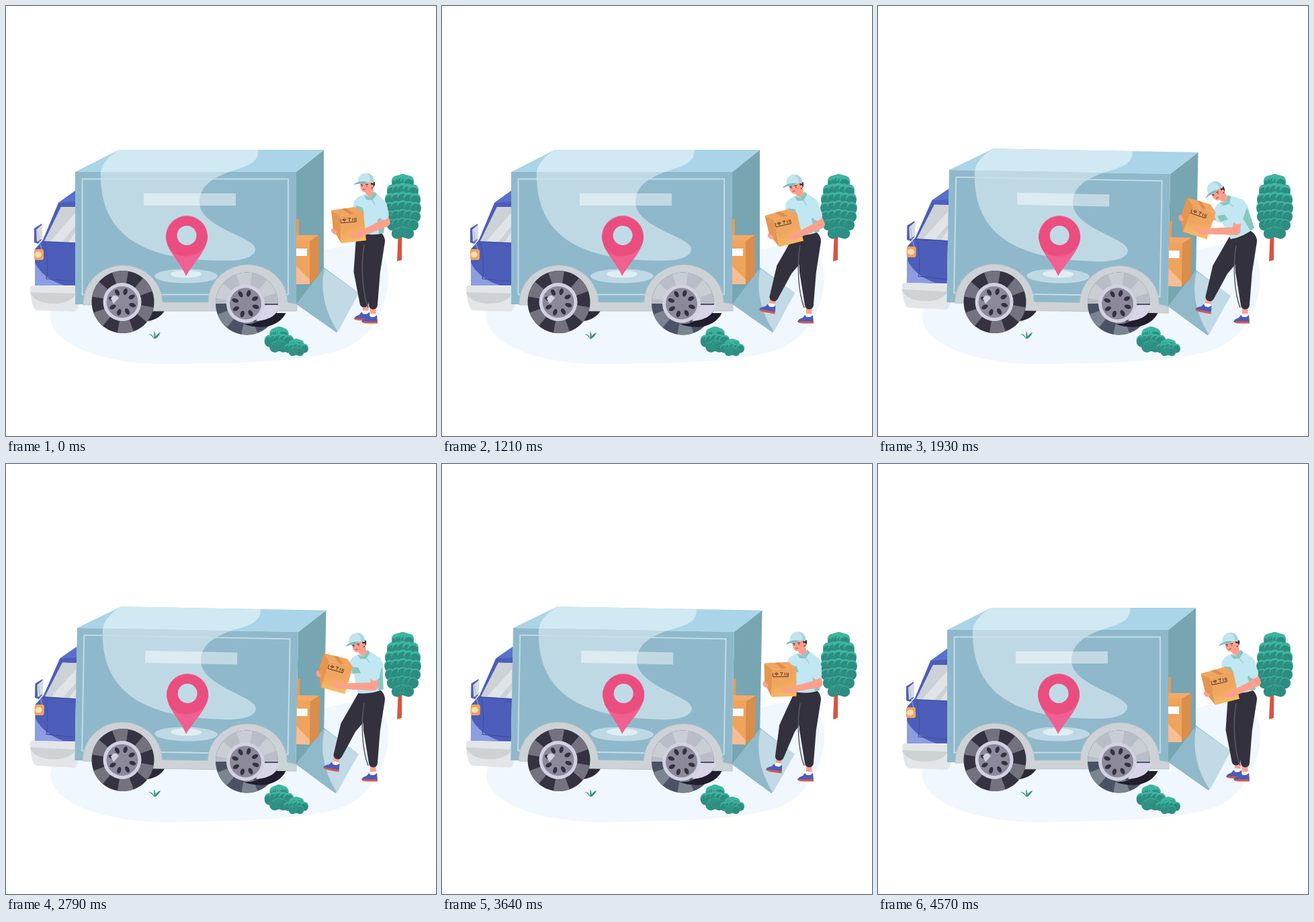
Recreate the animation shown at these times as an HTML page. Size 640 px wide and 640 px high, loop 4780 ms.

```html
<!DOCTYPE html>
<html lang="en">
<head>
<meta charset="utf-8">
<title>Delivery</title>
<style>
  html, body { margin: 0; width: 100%; height: 100%; overflow: hidden; background: #fff; }
  svg { display: block; width: 100%; height: 100%; }
</style>
</head>
<body>
<svg viewBox="0 0 640 640">
  <defs>
    <linearGradient id="card" x1="0" y1="0" x2=".3" y2="1">
      <stop offset="0" stop-color="#efa15b"/><stop offset=".6" stop-color="#f0a660"/><stop offset="1" stop-color="#f7ba60"/>
    </linearGradient>
    <g id="shoe">
      <path d="M-4-2H4.500V8H-4Z" fill="#fca08d"/>
      <path d="M-4 6H4.500L5 13H-5Z" fill="#fff"/>
      <path d="M-17 18Q-16 14-9 12L-6 8L-3 11H2L6 8L7 18Z" fill="#4c5bb9"/>
      <path d="M-17 17.500H7V20.500H-8Q-16 20.500-17 17.500Z" fill="#dc5745"/>
    </g>
    <g id="hub">
      <circle r="28.500" fill="#d2d1e2"/><circle r="23.500" fill="#8b899b"/>
      <g id="holes" fill="#34323f"></g>
    </g>
    <circle id="tread" r="37" pathLength="12" transform="rotate(-50)" fill="none" stroke-width="19" stroke-dasharray="1 1"/>
  </defs>

  <path fill="#f0f7ff" d="M66 462C66 502 140 533 240 533C335 532 440 530 495 513C550 495 569 440 569 402C569 368 547 352 522 354C490 357 460 366 440 380L75 440Q66 450 66 462Z"/>
  <path d="M584 335H589.500L589 378L582 380Z" fill="#d95340"/>
  <g id="tree"></g>
  <path fill="#2d2939" d="M200 452H237C230 465 215 471 200 469Z"/>

  <g id="truck">
    <path fill="#90b9ca" d="M473 389L525 427L492 486L431 443Z"/>
    <path fill="#c1dae5" d="M474 391L525 427L494 485C477 460 466 425 474 391Z"/>
    <path fill="#77a6b2" d="M432 247L473 214V390L432 444Z"/>
    <path fill="#e79a54" d="M432 317H436V343H432Z"/>
    <path fill="#f3a866" d="M432 341H466L452 350H432Z"/>
    <path fill="#f0a35c" d="M432 349H452V414H432Z"/>
    <path fill="#db8d4b" d="M452 350L466 341V401L452 414Z"/>
    <path fill="#f7bd94" d="M432 387L452 407V414H432Z"/>
    <path fill="#fff" d="M432 361H448V372H432Z"/>

    <path fill="#4c5eba" d="M103 275L78 293L55 348L43 362V416H103Z"/>
    <path fill="#5971cd" d="M103 275L78 293L103 291Z"/>
    <path fill="#8d9ddf" d="M43 382Q55 406 87 416H43Z"/>
    <path fill="#e0e4e8" d="M82 299L103 300V352L57 350Z"/>
    <path fill="#cdd2d6" d="M80 303L85 299H103V308L66 350H57ZM84 351L103 328V337L93 351Z"/>
    <path fill="none" stroke="#3f4fa3" stroke-width="1.200" d="M54 351L103 353M58 353Q64 390 60 406L103 410M94 357H103"/>
    <path fill="#4c5eba" d="M42 331L53 324V348L48 354L42 352Z"/>
    <path fill="#d7dce1" d="M45 333L54 325V346L46 351Z"/>
    <path fill="none" stroke="#aab1bd" d="M47 334L50 352L53 362"/>
    <rect x="42" y="362" width="14" height="16" rx="3" fill="#efa45c"/>
    <ellipse cx="48" cy="370" rx="5" ry="4.500" fill="#fbdbb4"/>
    <path fill="#e2e6e9" d="M36 420Q36 416 42 416L102 417Q110 418 110 433Q109 451 103 455L46 453Q38 451 36 420Z"/>
    <path fill="#ced2d5" d="M36 426L104 428C100 437 87 443 71 443C55 443 40 438 36 426Z"/>

    <path fill="#aad4e8" d="M103 247L168 214H473L432 247Z"/>
    <path fill="#8fb9cb" d="M103 247H432V444H103Z"/>
    <path fill="#d1e9f3" d="M168 214C153 223 143 235 141 247H332C353 240 378 235 375 214Z"/>
    <path fill="#bfd9e4" d="M141 247C139 335 195 378 320 379C355 380 372 372 371 361C369 343 288 330 288 292C288 268 308 256 332 247Z"/>
    <rect x="113.500" y="257.500" width="306.500" height="172" fill="none" stroke="#c6dee8" stroke-width="1.800"/>
    <path fill="#fff" opacity=".45" d="M205 279H342V297H205Z"/>
    <ellipse cx="268" cy="402" rx="47" ry="10.500" fill="#bfd9e4"/>
    <ellipse cx="268" cy="399" rx="23" ry="5.500" fill="#dfeef3"/>
    <path fill="#f06090" d="M268 402C259 380 238 364 238 343A31 31 0 0 1 300 343C300 364 279 382 268 402Z"/>
    <path fill="#ea4e7f" d="M238 346A31 31 0 0 1 300 343C300 376 250 382 241 357Z"/>
    <circle cx="269" cy="341.500" r="14.500" fill="#c1dbe6"/>
    <path fill="#cdd2d6" stroke="#b8bfc4" stroke-width=".8" d="M115 445A59 57 0 0 1 233 441H301A59 56 0 0 1 419 441L433 444V454H130V445Z"/>
  </g>

  <g transform="translate(174 440.500)">
    <circle r="46.500" fill="#353341"/>
    <use href="#tread" stroke="#73727e"/>
    <use href="#hub" x="-1"/>
    <path d="M-18-5Q-13-14-6-6L-14 3Z" fill="#d2d1e2"/>
  </g>
  <g transform="translate(358.500 443)">
    <circle r="46.500" fill="#4b5266"/>
    <use href="#tread" stroke="#7b8591"/>
    <path d="M-46.500 0A46.500 46.500 0 0 1 46.500 0Z" fill="#eef1f3" opacity=".68"/>
    <path d="M-6 30Q20 32 30 14H58C50 30 28 42-6 30Z" fill="#211d2e"/>
    <path d="M20 2H48C46 16 36 24 14 26Z" fill="#d9d5e8"/>
    <use href="#hub" x="-2"/>
  </g>

  <path fill="#2c8d80" d="M220 495Q219 488 212 488Q216 489 220 495ZM220 495Q221 488 220 484Q224 488 222 495ZM221 495Q225 487 230 486Q228 491 223 495Z"/>
  <g id="bush"></g>

  <g id="man">
    <use id="footA" href="#shoe"/>
    <use href="#shoe" x="546" y="452"/>
    <path id="legA" fill="#34313f"/>
    <path id="legB" fill="#34313f"/>
    <path fill="none" stroke="#5c5a68" stroke-width="1.500" d="M533 356C528 385 530 425 539 449"/>
    <path id="farArm" fill="#fca08d"/>
    <g id="torso">
      <path fill="#fca08d" d="M533 272L546 268L548 283L538 286Z"/>
      <path fill="#c0e7f2" d="M536 280C527 282 519 286 518 292L516 305L523 309V337Q543 343 562 338C564 325 567 313 568 303C566 290 556 282 548 277L543 286Z"/>
      <path fill="#87c6c0" d="M521 297L531 300L533 309L521 307ZM553 318L566 306L562 338L555 339Z"/>
      <path fill="#87c6c0" d="M533 281L542 285L549 276L552 281L545 289L536 288Z"/>
      <path fill="none" stroke="#96ced0" stroke-width="1.200" d="M545 288L551 300"/>
      <path fill="#35262f" d="M541 261L549 262Q550 270 543 272Z"/>
      <path fill="#fca08d" d="M527 263L543 262L544 271Q540 279 533 277Q527 276 527 263Z"/>
      <circle cx="545" cy="268" r="2.200" fill="#fca08d"/>
      <path fill="none" stroke="#4a2830" stroke-width="1.100" d="M528 266H531M535 265.500H539M530 267V268.500M537 267V268.500"/>
      <path fill="none" stroke="#d9474f" stroke-width="1.300" d="M531 273H535"/>
      <path fill="#c1e6ef" d="M524 263C523 254 528 249 536 248.500C545 249 549 255 547 264Q536 260 524 263Z"/>
      <path fill="#a7d5de" d="M537 249Q544 254 542 262L547 264Q549 251 537 249Z"/>
      <path fill="#7dbdbd" d="M518 265Q525 259 539 262L532 265Q524 264 518 266Z"/>
    </g>
    <g id="parcel">
      <path fill="#f1a55f" d="M-25-14L11-19L23-11L-12-6Z"/>
      <path fill="#dc8d49" d="M-9-16L-3-17L9-9L2-8Z"/>
      <path fill="#e59550" d="M-25-14L-12-6L-10 35L-22 15Z"/>
      <path fill="url(#card)" d="M-12-6L23-11L27 31L-10 35Z"/>
      <path transform="rotate(-5)" fill="none" stroke="#4b3428" stroke-width=".9" d="M-11 4H12V-2M-11-2V4M-8 0Q-6-4-3 0ZM-5.500 0V2.500M0-2H4L2 0V2.500M7 2.500V-2M10 2.500V-2"/>
      <path fill="#fca08d" d="M-24 13Q-19 14-16 19L-18 22L-22 21L-25 17Z"/>
    </g>
    <path id="nearArm" fill="#fca08d"/>
    <path id="sleeve" fill="#c0e7f2"/>
  </g>
</svg>
<script>
const LOOP = 4780, FRAMES = 67, STEP = LOOP / FRAMES;
const WAIST = [545, 338];
const $ = id => document.getElementById(id);
const set = (id, name, value) => $(id).setAttribute(name, value);

const ramp = (t, from, to) => Math.min(1, Math.max(0, (t - from) / (to - from)));
const mix = (a, b, k) => Array.isArray(a) ? a.map((v, i) => mix(v, b[i], k)) : a + (b - a) * k;
const blend = (a, b, k) => Object.fromEntries(Object.keys(a).map(key => [key, mix(a[key], b[key], k)]));

// Rows of leaf lumps inside an oval; the light rims thin out towards the ground.
function clump(id, cx, cy, rx, ry, r, rows) {
  let svg = '';
  for (let row = 0; row < rows; row++) {
    const k = row / (rows - 1), v = 2 * k - 1;
    const half = rx * Math.sqrt(1 - .8 * v * v);
    for (let side = -1; side <= 1; side += .5) {
      const x = cx + side * half, y = cy + v * ry + Math.abs(side) * r * .3;
      svg += `<circle cx="${x}" cy="${y}" r="${r}" fill="#3cb6a0"/>` +
        `<circle cx="${x}" cy="${y + r * mix(.6, .05, k)}" r="${r - .3}" fill="#2e8c80"/>`;
    }
  }
  $(id).innerHTML += svg;
}
clump('tree', 590.5, 297, 19.5, 39, 8, 7);
clump('bush', 406.5, 495, 14, 10, 8, 3);
clump('bush', 432, 507, 12, 6, 6, 3);

$('holes').innerHTML = Array.from({ length: 8 }, (_, i) =>
  `<ellipse cy="-16" rx="3" ry="5" transform="rotate(${i * 45 + 17})"/>`).join('');

function turn([x, y], deg, [cx, cy]) {
  const a = deg * Math.PI / 180, c = Math.cos(a), s = Math.sin(a);
  return [cx + x * c - y * s, cy + x * s + y * c];
}

// Tapered limb with round ends.
function limb([ax, ay], [bx, by], ra, rb) {
  const d = Math.hypot(bx - ax, by - ay) || 1;
  const nx = (ay - by) / d, ny = (bx - ax) / d;
  return `M${ax + nx * ra} ${ay + ny * ra}A${ra} ${ra} 0 0 1 ${ax - nx * ra} ${ay - ny * ra}` +
    `L${bx - nx * rb} ${by - ny * rb}A${rb} ${rb} 0 0 1 ${bx + nx * rb} ${by + ny * rb}Z`;
}

const leg = (hip, knee, ankle) => limb(hip, knee, 17, 12.5) + limb(knee, ankle, 12.5, 6.5);
set('legB', 'd', leg([547, 350], [544.5, 395], [546.5, 445]));

function drawStride(p) {
  const ankle = mix([533, 442], [494, 433], p);
  set('legA', 'd', leg([537.5, 352], mix([530, 395], [510, 391], p), ankle));
  set('footA', 'transform', `translate(${mix([535, 447.5], [492, 437], p)}) rotate(${10 * p})`);
}

const rest = { lean: 0, box: [509, 318], spin: 0, elbow: [566, 322] };
const carry = { lean: -8.5, box: [507, 322.5], spin: -8, elbow: [564, 325] };
const reach = { lean: -27, box: [477, 308], spin: 24, elbow: [533, 335] };
const load = { lean: 0, box: [499, 301], spin: 20, elbow: [556, 329] };

function poseAt(t) {
  const carried = blend(rest, carry, ramp(t, 360, 1030));
  const reached = blend(carried, reach, ramp(t, 1250, 1930));
  const raised = blend(reached, load, ramp(t, 2070, 3210));
  return blend(raised, carry, ramp(t, 3210, 4000));
}

function drawBody({ lean, box, spin, elbow }) {
  const onBody = point => turn(point, lean, WAIST);
  const onBox = point => turn(point, spin, box);
  set('torso', 'transform', `rotate(${lean} ${WAIST})`);
  set('parcel', 'transform', `translate(${box}) rotate(${spin})`);

  const shoulder = onBody([13, -41]), wrist = onBox([15, 23]);
  set('farArm', 'd', limb(onBody([-20, -36]), onBox([-19, 18]), 4, 3));
  set('nearArm', 'd', limb(shoulder, elbow, 5, 6) + limb(elbow, wrist, 6, 4) + limb(wrist, onBox([5, 24]), 5, 2.5));
  set('sleeve', 'd', limb(shoulder, mix(shoulder, elbow, .55), 9, 7.5));
}

function draw(t) {
  const tilt = ramp(t, 1270, 1880) - ramp(t, 3715, 4420);
  set('truck', 'transform', `rotate(${1.06 * tilt} 268 405)`);
  drawStride(ramp(t, 380, 1060) - ramp(t, 3440, 4360));
  drawBody(poseAt(t));
}

const start = performance.now();
function tick() {
  const t = (performance.now() - start) % LOOP;
  draw(Math.floor((t + 4) / STEP) % FRAMES * STEP);
  requestAnimationFrame(tick);
}
tick();
</script>
</body>
</html>
```
